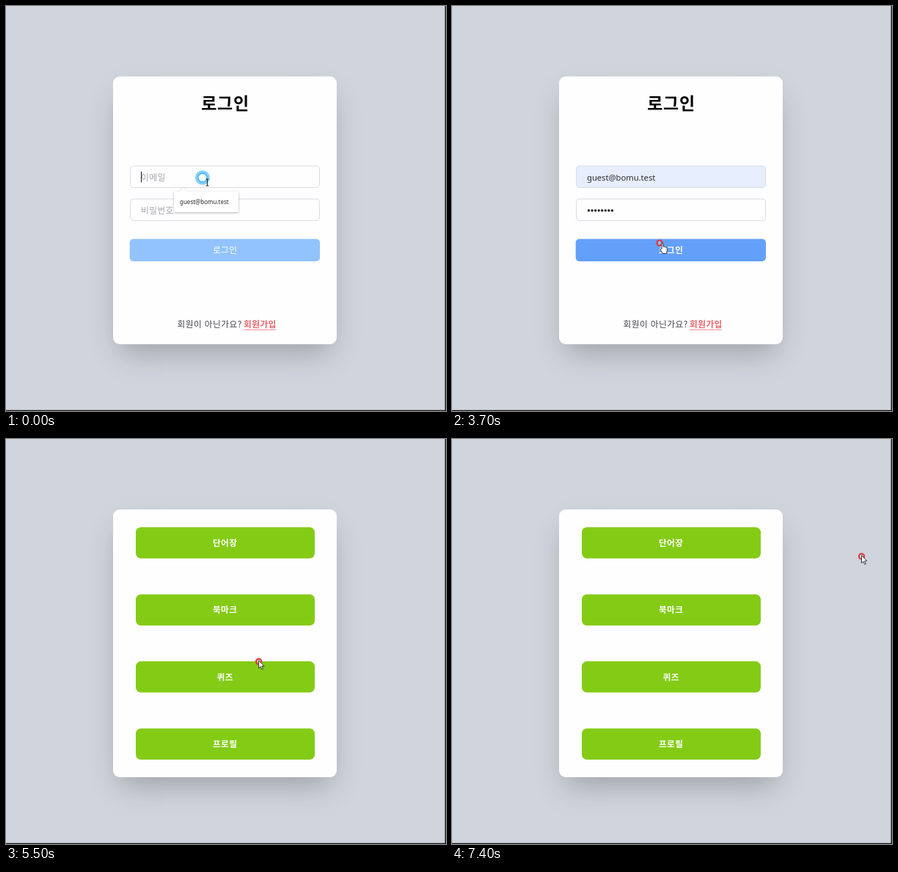
Recreate the animation shown at these times as an HTML page. Size 600 by 552 pixels, loop 7.5 s.

```html
<!DOCTYPE html>
<html lang="ko">
<head>
<meta charset="utf-8">
<style>
html, body { margin: 0; width: 100%; height: 100%; overflow: hidden; background: #d0d4dc; }
svg { position: absolute; left: 0; top: 0; }
#card {
  position: absolute; left: 146px; top: 95.5px; width: 305px; height: 365.5px;
  border-radius: 9px; background: #fefdff; box-shadow: 0 19px 38px -9px rgba(0,0,0,.25);
}
text { font: 11.7px "Noto Sans CJK KR", "Noto Sans CJK", sans-serif; letter-spacing: .45px; }
.mid { text-anchor: middle; }
.bold { font-weight: 700; }
.title { font-size: 23px; letter-spacing: .7px; }
.hint { fill: #a2a5ac; }
.mail { font: 11.2px "Noto Sans", "Open Sans", sans-serif; letter-spacing: 0; fill: #2b2c30; }
.small { font-size: 8px; }
.field { x: 169.5px; width: 258px; height: 29.5px; rx: 4.5px; fill: #fefdff; stroke: #dadce3; }
.item { x: 177px; width: 244px; height: 42.5px; rx: 7px; fill: #84cb16; }
.cursor { fill: #fff; stroke: #26282c; stroke-width: .9; }
</style>
</head>
<body>
<div id="card"></div>
<svg width="600" height="552">
  <g id="login">
    <text class="mid bold title" x="299" y="141">로그인</text>
    <rect id="mailBox" class="field" y="218"/>
    <text id="mailHint" class="hint" x="184" y="237.5">이메일</text>
    <text id="mail" class="mail" x="184" y="237.5">guest@bomu.test</text>
    <rect class="field" y="263"/>
    <text id="passHint" class="hint" x="184" y="282.5">비밀번호</text>
    <g id="dots" fill="#222"></g>
    <rect id="caret" width="1" height="15" fill="#222"/>
    <rect id="button" x="168.7" y="317.5" width="259.3" height="30.5" rx="5"/>
    <text id="buttonText" class="mid" x="298.7" y="337.3" fill="#fff">로그인</text>
    <text x="233.5" y="438" fill="#444549">회원이 아닌가요?</text>
    <text class="bold" x="324" y="438" fill="#e9676b">회원가입</text>
    <path d="M324 441.2h44" stroke="#e9676b" stroke-width=".8"/>
    <g id="popup">
      <path d="M229 253h7l6-5 6 5h69v28h-88z" fill="#fff" style="filter:drop-shadow(0 1px 1.5px rgba(0,0,0,.3))"/>
      <text class="mail small" x="237" y="270">guest@bomu.test</text>
    </g>
  </g>
  <g id="menu"></g>
  <rect id="status" x="-1" y="548.5" width="152" height="9" rx="2" fill="#e3e5ea" stroke="#b4b8c0"/>
  <path d="M599.3 0V551.5H0" fill="none" stroke="#16171a" stroke-width="1.4"/>
  <g id="mouse">
    <circle id="halo" fill="#86d1f9"/>
    <circle id="ring"/>
    <path id="beam" d="M4.5 2h4M6.5 2v9M4.5 11h4" fill="none" stroke="#222"/>
    <path id="hand" class="cursor" d="M3 8V1q1-3 2 0V5q6 0 5.5 4L9.5 14.5h-5L1 9z"/>
    <path id="arrow" class="cursor" d="M0-1.5V9l2.4-2.2 1.7 4 1.7-.7L4.1 6.2H7.3z"/>
  </g>
</svg>
<script>
const $ = id => document.getElementById(id);
const show = (id, on) => $(id).style.display = on ? '' : 'none';
const set = (id, attrs) => { for (const k in attrs) $(id).setAttribute(k, attrs[k]); };
const clamp = (v, lo, hi) => Math.min(hi, Math.max(lo, v));

const loop = 7500, step = 100, glide = 300;
const passLength = 8, pitch = 4.55;
const clicks = [0, 400, 800, 4300];

// each glide of the pointer: start time and destination
const start = [268, 234];
const glides = [
  [100, 264, 263], [500, 237, 274.5], [900, 234, 275.5], [3400, 283, 323],
  [5400, 468, 264], [5700, 499, 293], [6600, 552, 32], [7000, 558.5, 160]
];

for (let i = 0; i < passLength; i++)
  $('dots').innerHTML += `<circle cx="${186.5 + i * pitch}" cy="278.8" r="1.7"/>`;
['단어장', '북마크', '퀴즈', '프로필'].forEach((name, i) => {
  const y = 120.3 + i * 91.4;
  $('menu').innerHTML += `<rect class="item" y="${y}"/>
    <text class="mid bold" x="298.7" y="${y + 25.5}" fill="#fff">${name}</text>`;
});

function pointer(t) {
  return glides.reduce(([x, y], [from, toX, toY]) => {
    const k = clamp((t - from) / glide, 0, 1);
    return [x + (toX - x) * k, y + (toY - y) * k];
  }, start);
}

function drawMouse(t) {
  set('mouse', { transform: `translate(${pointer(t)})` });
  const age = t - clicks.findLast(c => c <= t);
  const big = age < 100, blue = age < 200;
  show('halo', blue);
  set('halo', { r: big ? 10 : 6.5 });
  set('ring', {
    r: big ? 6 : 3.6,
    fill: blue ? '#fff' : 'rgba(255,255,255,.3)',
    stroke: blue ? '#35b3ec' : '#dc3e46',
    'stroke-width': blue ? 1.3 : 2.3
  });
  const hand = t >= 3600 && t < 5300;
  const arrow = t >= 300 && t < 500 || t >= 5300;
  show('hand', hand);
  show('arrow', arrow);
  show('beam', !hand && !arrow);
}

function draw(t) {
  const typed = clamp(Math.floor((t - 1300) / 200), 0, passLength);
  const filled = t >= 300, inMenu = t >= 5500;
  show('login', !inMenu);
  show('menu', inMenu);
  show('status', t >= 5300 && !inMenu);
  show('popup', t < 500);
  show('mail', filled);
  show('mailHint', !filled);
  show('passHint', !typed);
  $('mailBox').style.fill = filled ? '#e7eefe' : '';
  [...$('dots').children].forEach((dot, i) => dot.style.display = i < typed ? '' : 'none');

  show('caret', t < 1200 || t >= 1400 && t < 3500);
  set('caret', { x: 184 + typed * pitch, y: t < 800 ? 225.5 : 270.5 });

  const hover = 1 - (1 - clamp((t - 3500) / 500, 0, 1)) ** 1.5;
  $('button').style.fill = `color-mix(in srgb, #3b82f6 ${hover * 100}%, #92c3fd)`;
  $('buttonText').classList.toggle('bold', t >= 3600);
  drawMouse(t);
}

function tick() {
  draw(Math.floor(performance.now() % loop / step) * step);
  requestAnimationFrame(tick);
}
tick();
</script>
</body>
</html>
```
